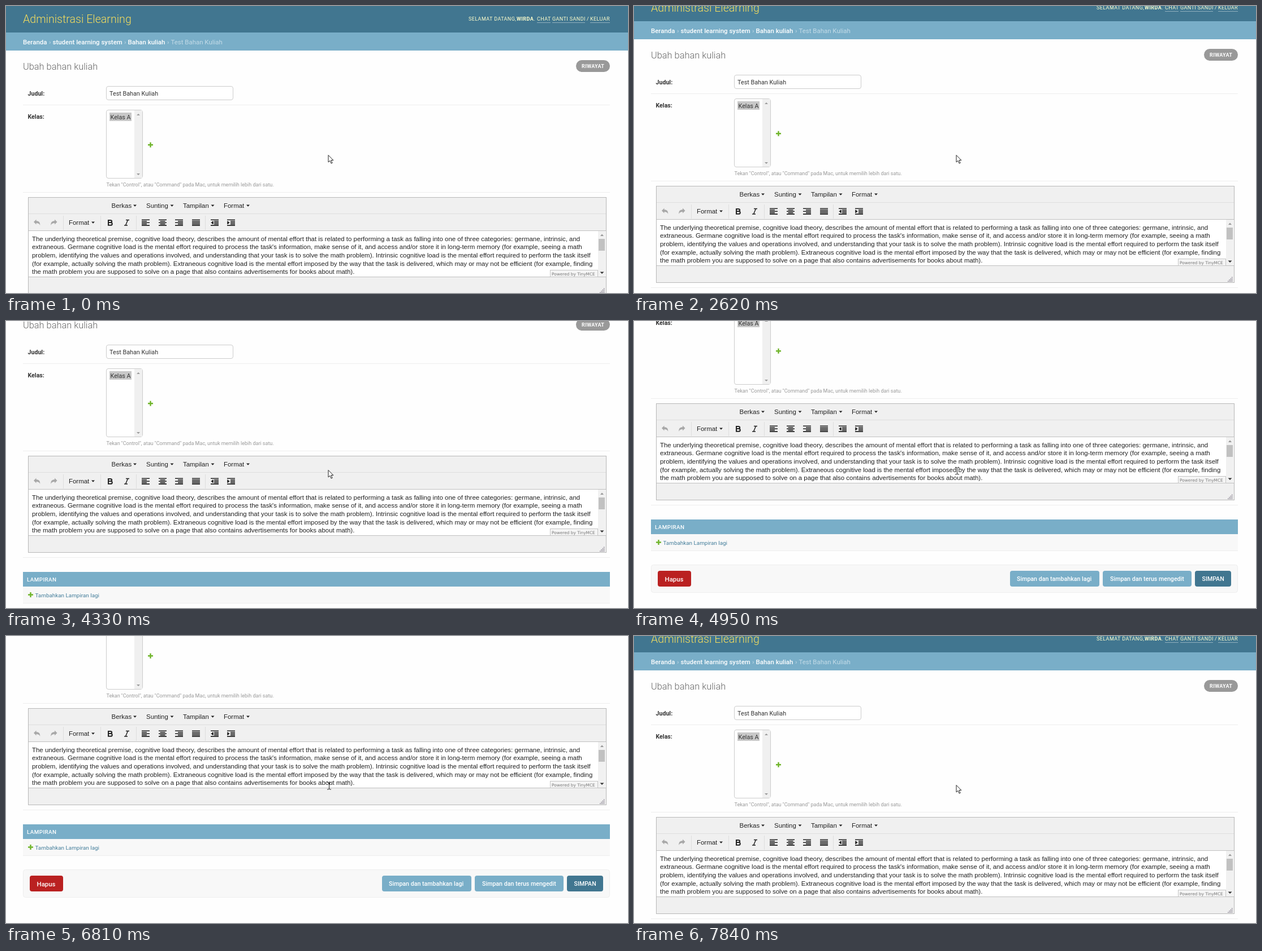
Animation, 1100 px wide and 509 px high, one loop 7.99 s. Source, as an HTML page:

```html
<!DOCTYPE html>
<html lang="id">
<head>
<meta charset="utf-8">
<title>Ubah bahan kuliah</title>
<style>
html, body { margin: 0; width: 100%; height: 100%; overflow: hidden; background: #fefefe; }
svg { display: block; }
text { font: 10.63px Roboto, sans-serif; fill: #333; white-space: pre; }
.brand { font-size: 19.6px; font-weight: 300; fill: #f5dd5d; }
.tools text { font-size: 9px; letter-spacing: .41px; fill: #ffc; }
.crumbs text { font-size: 11.45px; font-weight: 500; fill: #fff; }
.crumbs .dim { font-weight: 400; fill: #c4dce8; }
.title { font-size: 16.36px; font-weight: 300; fill: #666; }
.pill { font-size: 9px; font-weight: 700; letter-spacing: .41px; fill: #fff; }
.bold { font-weight: 700; }
.field { font-size: 10.8px; }
.help { font-size: 9px; fill: #999; }
.edit text { font: 11.45px "Liberation Sans", Arial, sans-serif; fill: #222; }
.edit .tiny { font: 7.4px "DejaVu Sans", sans-serif; fill: #777; }
.caption { font-size: 9.8px; font-weight: 500; letter-spacing: .41px; fill: #fff; }
.add { font-size: 9.9px; fill: #447e9b; }
.btn text { font-weight: 500; fill: #fff; }
</style>
</head>
<body>
<svg width="1100" height="509" viewBox="0 0 1100 509">
<g id="page">
  <path fill="#417690" d="M0 0h1100v47H0z"/>
  <path fill="#79aec8" d="M0 47h1100v32H0z"/>
  <text class="brand" x="30" y="30">Administrasi Elearning</text>
  <g class="tools">
    <text x="818" y="26">SELAMAT DATANG,</text>
    <text x="903" y="26"><tspan class="bold">WIRDA</tspan>.</text>
    <text x="939" y="26">CHAT</text>
    <text x="966" y="26">GANTI SANDI</text>
    <text x="1027" y="26">/</text>
    <text x="1033" y="26">KELUAR</text>
    <path stroke="#8fafbe" d="M939 29.5h24M966 29.5h58M1033 29.5h35"/>
  </g>
  <g class="crumbs">
    <text x="30" y="67.5">Beranda</text>
    <text class="dim" x="76" y="67.5">›</text>
    <text x="82.5" y="67.5">student learning system</text>
    <text class="dim" x="209" y="67.5">›</text>
    <text x="215.5" y="67.5">Bahan kuliah</text>
    <text class="dim" x="285" y="67.5">›</text>
    <text class="dim" x="291.5" y="67.5">Test Bahan Kuliah</text>
  </g>

  <text class="title" x="30" y="113">Ubah bahan kuliah</text>
  <rect x="1008" y="96" width="60" height="21" rx="10.5" fill="#999"/>
  <text class="pill" x="1018" y="109.5">RIWAYAT</text>

  <path stroke="#eee" d="M30 175.5h1038M30 330.5h1038M30 519.5h1038"/>
  <text class="bold" x="38.5" y="158.5">Judul:</text>
  <text class="bold" x="38.5" y="200">Kelas:</text>
  <g fill="#fff" stroke="#ccc">
    <rect x="177.5" y="142.5" width="224" height="24" rx="3.5"/>
    <rect x="177.5" y="184.5" width="64" height="121" rx="3.5"/>
  </g>
  <text class="field" x="183" y="158.5">Test Bahan Kuliah</text>
  <path fill="#f0f0f0" d="M227 185h14v120h-14z"/>
  <path fill="#c8c8c8" d="M183 189h39v15h-39z"/>
  <path fill="#999" d="M231 194l3-3 3 3zM231 297l3 3 3-3z"/>
  <text class="field" x="184.5" y="200.5">Kelas A</text>
  <path class="plus" stroke="#70b52b" stroke-width="2.4" d="M251 246.3h9M255.5 241.8v9"/>
  <text class="help" x="177.5" y="319.5">Tekan "Control", atau "Command" pada Mac, untuk memilih lebih dari satu.</text>

  <g class="edit">
    <rect x="39.500" y="339.500" width="1022" height="171" fill="#f0f0f0" stroke="#b8b8b8"/>
    <path fill="#fff" d="M40 399h1021v81H40z"/>
    <path stroke="#dedede" d="M40 368.500h1021M101.500 372v25M167.500 372v25M230.500 372v25M352.500 372v25"/>
    <path stroke="#c0c0c0" d="M40 398.500h1021M40 480.500h1021"/>
    <text x="186.500" y="358">Berkas</text>
    <text x="248" y="358">Sunting</text>
    <text x="313" y="358">Tampilan</text>
    <text x="385" y="358">Format</text>
    <text x="111" y="388">Format</text>
    <path fill="#222" d="M225 352.500h6l-3 3.300zM290.500 352.500h6l-3 3.300zM362.500 352.500h6l-3 3.300zM425 352.500h6l-3 3.300zM151 382.500h6l-3 3.300z"/>
    <path id="undo" fill="#a8a8a8" d="M49 383l4.500-4.500v2.700c4.500 0 7 2 6.700 7.800-1.200-3-3-4-6.700-4v2.500z"/>
    <use href="#undo" transform="translate(139.500) scale(-1 1)"/>
    <path fill="none" stroke="#222" stroke-width="2" d="M181 380v8.500M180 380h4.500c3.500 0 3.500 4 0 4H181h4c3.700 0 3.700 4.800 0 4.800h-5"/>
    <path fill="none" stroke="#222" stroke-width="1.500" d="M212 379.500h6M209 389h6M215.500 379.500l-4 9.500"/>
    <path id="icons" stroke="#222" stroke-width="1.600"/>
    <g id="essay"></g>
    <path fill="#f1f1f1" d="M1047 399h13v81h-13z"/>
    <path fill="#c1c1c1" d="M1048 413h11v21h-11z"/>
    <path fill="#999" d="M1051 408l3-3.500 3 3.500z"/>
    <path fill="#333" d="M1050.500 471.500l3.500 3.500 3.500-3.500z"/>
    <rect x="962.500" y="468.500" width="84" height="12" fill="#f5f5f5" stroke="#c5c5c5"/>
    <text class="tiny" x="965" y="477.500">Powered by TinyMCE</text>
    <path id="grip" fill="#8f8a96"/>
  </g>

  <path fill="#79aec8" d="M30 545h1038v26H30z"/>
  <path fill="#f8f8f8" d="M30 571h1038v29H30z"/>
  <path stroke="#eee" d="M30 600.5h1038"/>
  <text class="caption" x="37" y="562">LAMPIRAN</text>
  <path stroke="#70b52b" stroke-width="2.4" d="M39 585.500h9M43.500 581v9"/>
  <text class="add" x="51.500" y="590">Tambahkan Lampiran lagi</text>

  <rect x="30.500" y="625.500" width="1037" height="49" rx="4" fill="#f8f8f8" stroke="#eee"/>
  <g class="btn">
    <rect x="42" y="636" width="59" height="28" rx="4" fill="#ba2121"/>
    <rect x="665" y="636" width="158" height="28" rx="4" fill="#79aec8"/>
    <rect x="829" y="636" width="157" height="28" rx="4" fill="#79aec8"/>
    <rect x="992" y="636" width="64" height="28" rx="4" fill="#417690"/>
    <text x="54.500" y="654.500" style="font-size:11.45px">Hapus</text>
    <text x="677" y="654">Simpan dan tambahkan lagi</text>
    <text x="842" y="654">Simpan dan terus mengedit</text>
    <text x="1004.500" y="654">SIMPAN</text>
  </g>
</g>
<circle id="click" cx="569" cy="265" r="9.700" fill="#ffff80"/>
<path id="arrow" fill="#fff" stroke="#222" d="M570 264.500v12.500l2.900-2.600 2.200 4.800 2-.9-2.200-4.700h4z"/>
<path id="beam" fill="none" stroke="#222" d="M568 259.500h2.500l1 1 1-1h2.500M571.500 260v11.500M568 272h2.500l1-1 1 1h2.500"/>
</svg>
<script>
const $ = id => document.getElementById(id);
const LOOP = 7990;

const essay = [
  "The underlying theoretical premise, cognitive load theory, describes the amount of mental effort that is related to performing a task as falling into one of three categories: germane, intrinsic, and",
  "extraneous. Germane cognitive load is the mental effort required to process the task's information, make sense of it, and access and/or store it in long-term memory (for example, seeing a math",
  "problem, identifying the values and operations involved, and understanding that your task is to solve the math problem). Intrinsic cognitive load is the mental effort required to perform the task itself",
  "(for example, actually solving the math problem). Extraneous cognitive load is the mental effort imposed by the way that the task is delivered, which may or may not be efficient (for example, finding",
  "the math problem you are supposed to solve on a page that also contains advertisements for books about math)."
];
$("essay").innerHTML = essay.map((line, i) =>
  `<text x="46" y="${416.5 + 14.7 * i}">${line}</text>`).join("");

// Each icon is five bars: left edge, then inset and width of the short rows
const icons = [[240, 0, 9], [270, 2.5, 9], [299, 5, 9], [329, 0, 14], [362, 6, 8], [391, 6, 8]];
let bars = "";
icons.forEach(([x, inset, width], n) => {
  for (let row = 0; row < 5; row++) {
    const short = n < 4 ? row % 2 : row > 0 && row < 4;
    bars += `M${x + (short ? inset : 0)} ${379.3 + row * 2.45}h${short ? width : 14}`;
  }
});
$("icons").setAttribute("d", bars + "M366 381.500v5.500M364.800 382.500v3.500M363.500 383.500v1.500M392 381.500v5.500M393.200 382.500v3.500M394.500 383.500v1.500");

let dots = "";
for (let r = 0; r < 4; r++)
  for (let c = 3 - r; c < 4; c++) dots += `M${1050 + c * 2.3} ${500.5 + r * 2.3}h1.500v1.500h-1.500z`;
$("grip").setAttribute("d", dots);

// Wheel notches down: step times, then the resting place
const notches = [
  [2620, 2700, 34], [3320, 3390, 3470, 66], [3930, 4010, 4100, 98], [4330, 4400, 4480, 136],
  [4630, 4710, 4800, 173], [4950, 5030, 207], [5490, 5570, 5650, 214]
];
const steps = [[0, 0]];
let rest = 0;
for (const notch of notches) {
  const end = notch.pop();
  const ease = notch.length > 2 ? [.06, .65, 1] : [.6, 1];
  notch.forEach((t, i) => steps.push([t, Math.round(rest + (end - rest) * ease[i])]));
  rest = end;
}
// Scrolling back up
[211, 192, 180, 177, 158, 146, 124, 109, 90, 78, 74].forEach((y, i) =>
  steps.push([i === 7 ? 7280 : 6740 + 78 * i, y]));
steps.push([7590, 60], [7670, 44], [7760, 32], [7840, 18]);

const show = (id, on) => $(id).style.display = on ? "" : "none";

function draw() {
  const t = performance.now() % LOOP;
  const y = steps.findLast(step => step[0] <= t)[1];
  $("page").setAttribute("transform", `translate(0 ${-y})`);
  const overText = t >= 4710 && t < 7520;
  show("click", t >= 1460 && t < 1690);
  show("arrow", !overText);
  show("beam", overText);
  requestAnimationFrame(draw);
}
draw();
</script>
</body>
</html>
```
